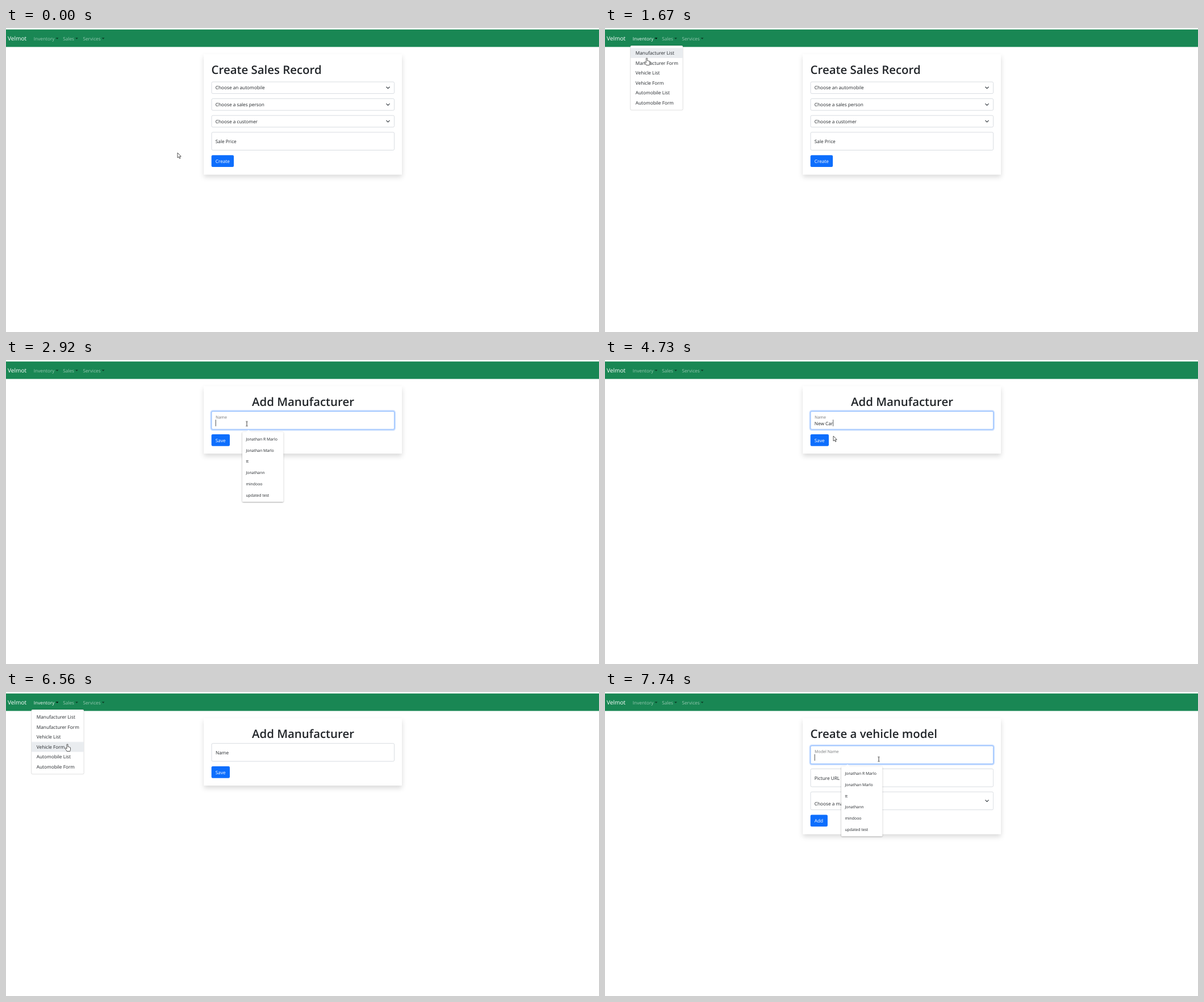
Animation, 1044 px wide and 536 px high, one loop 8 s. Source, as an HTML page:

```html
<!DOCTYPE html>
<html lang="en">
<head>
<meta charset="utf-8">
<title>Dealership forms</title>
<style>
html, body { margin: 0; width: 100%; height: 100%; overflow: hidden; background: #fff; }
svg { display: block; width: 1044px; height: 536px; font: 8.25px "Open Sans", "Noto Sans", sans-serif; text-rendering: geometricPrecision; }
text { fill: #212529; white-space: pre; }
.title { font-size: 20.4px; font-weight: 600; }
.brand { font-size: 10.1px; fill: #fff; }
.nav text, .nav path { fill: #fff; }
.nav { fill-opacity: .55; }
.card { fill: #fff; filter: url(#shadow); }
.box { fill: #fff; stroke: #ced4da; stroke-width: .8; }
.ring { fill: none; stroke: #0d6efd; stroke-opacity: .25; stroke-width: 2.2; }
.btn { fill: #0d6efd; }
.btn + text, .on-btn { fill: #fff; }
.caret { fill: #212529; }
.hints text { font-size: 6.9px; }
.hints rect { fill: #fff; filter: url(#popup); }
.pointer { fill: #fff; stroke: #111; stroke-width: .7; stroke-linejoin: round; }

/* hard switches */
#sales, #maker, #model, #menu, #hover, #invLink, #makerHints, #modelHints, #makerCaret,
#typed, #typeEdge, #modelCaret, #arrow, #hand, #beam { animation: 8s step-end infinite; }
/* eased changes */
#cursor, #makerBox, #makerRing, #makerLabel, #modelBox, #modelRing, #modelLabel,
#saveFill, #saveRing { animation: 8s linear infinite; }

#sales { animation-name: sales; }
#maker { animation-name: maker; }
#model { animation-name: model; }
@keyframes sales { 0% { opacity: 1 } 25.25%, 100% { opacity: 0 } }
@keyframes maker { 0% { opacity: 0 } 25.25% { opacity: 1 } 85.1%, 100% { opacity: 0 } }
@keyframes model { 0% { opacity: 0 } 85.1%, 100% { opacity: 1 } }

#menu { animation-name: menu; }
@keyframes menu { 0%, 25.25%, 85.1%, 100% { opacity: 0 } 11.6%, 76.1% { opacity: 1 } }
#hover { animation-name: hover; }
@keyframes hover {
  0%, 76.1%, 100% { opacity: 0; transform: none }
  16.8%, 79.5% { opacity: 1; transform: none }
  21.6%, 80.2% { opacity: 1; transform: translateY(17.56px) }
  80.9% { opacity: 1; transform: translateY(35.12px) }
  81.6% { opacity: 1; transform: translateY(52.68px) }
}
#invLink { animation-name: invLink; }
@keyframes invLink {
  0%, 25.25%, 85.1%, 100% { fill-opacity: .55 }
  8.13%, 73.9% { fill-opacity: .75 }
  11.6%, 76.1% { fill-opacity: .92 }
}

#makerBox { animation-name: makerBox; }
#makerRing { animation-name: makerRing; }
#makerLabel { animation-name: makerLabel; }
@keyframes makerBox { 0%, 34%, 65.8%, 100% { stroke: #ced4da } 35.9%, 64% { stroke: #86b7fe } }
@keyframes makerRing { 0%, 34%, 65.8%, 100% { opacity: 0 } 35.9%, 64% { opacity: 1 } }
@keyframes makerLabel {
  0%, 34%, 67.2%, 100% { transform: translate(369px, 109.6px); opacity: 1 }
  35.3%, 66% { transform: translate(369px, 103px) scale(.86); opacity: .65 }
}
#makerHints { animation-name: makerHints; }
@keyframes makerHints { 0%, 46.25%, 100% { opacity: 0 } 36.4% { opacity: 1 } }
#makerCaret { animation-name: makerCaret; }
@keyframes makerCaret { 0%, 40.62%, 64%, 100% { opacity: 0 } 34%, 46.25% { opacity: 1 } }
#typed { animation-name: typed; }
@keyframes typed { 0%, 66%, 100% { opacity: 0 } 46.25% { opacity: 1 } }
#typeEdge { animation-name: typeEdge; }
@keyframes typeEdge {
  0% { transform: none }
  46.25% { transform: translateX(6.1px) }
  48.12% { transform: translateX(10.7px) }
  49.2% { transform: translateX(17.1px) }
  50.2% { transform: translateX(19.2px) }
  51.3% { transform: translateX(24.4px) }
  52.37% { transform: translateX(29px) }
  54.87%, 100% { transform: translateX(32.4px) }
}
#saveFill { animation-name: saveFill; }
#saveRing { animation-name: saveRing; }
@keyframes saveFill { 0%, 61%, 78%, 100% { fill: #0d6efd } 62.9%, 76.1% { fill: #0b5ed7 } }
@keyframes saveRing { 0%, 64%, 78%, 100% { opacity: 0 } 65.8%, 76.1% { opacity: 1 } }

#modelBox { animation-name: modelBox; }
#modelRing { animation-name: modelRing; }
#modelLabel { animation-name: modelLabel; }
#modelCaret { animation-name: modelCaret; }
#modelHints { animation-name: modelHints; }
@keyframes modelBox { 0%, 94.7% { stroke: #ced4da } 96.6%, 100% { stroke: #86b7fe } }
@keyframes modelRing { 0%, 94.7% { opacity: 0 } 96.6%, 100% { opacity: 1 } }
@keyframes modelLabel {
  0%, 94.7% { transform: translate(369px, 113.9px); opacity: 1 }
  96%, 100% { transform: translate(369px, 107.4px) scale(.86); opacity: .65 }
}
@keyframes modelCaret { 0% { opacity: 0 } 94.7%, 100% { opacity: 1 } }
@keyframes modelHints { 0% { opacity: 0 } 96.7%, 100% { opacity: 1 } }

#cursor { animation-name: cursor; }
@keyframes cursor {
  0%, 2% { transform: translate(302px, 220px) }
  2.01% { transform: translate(326px, 217px) }
  5.5%, 8.12% { transform: translate(67px, 3px) }
  10.75% { transform: translate(70px, 15px) }
  14.75% { transform: translate(70px, 17px) }
  17.4% { transform: translate(72px, 40px) }
  20.88%, 21.4% { transform: translate(73.5px, 53px) }
  24.4%, 28.6% { transform: translate(89px, 65px) }
  32.2% { transform: translate(395px, 108px) }
  34%, 48.1% { transform: translate(424px, 112.5px) }
  52.4%, 58.3% { transform: translate(461px, 141px) }
  59.1%, 59.9% { transform: translate(402px, 134px) }
  62.2%, 69.4% { transform: translate(384px, 141px) }
  71.9% { transform: translate(22px, 52px) }
  73.5%, 74.3% { transform: translate(66.5px, 27.5px) }
  75.4%, 77.9% { transform: translate(69px, 19px) }
  79.6% { transform: translate(75px, 40px) }
  82%, 82.8% { transform: translate(108px, 92px) }
  83.8%, 89.75% { transform: translate(107px, 89px) }
  93.2% { transform: translate(460px, 114px) }
  94.6%, 100% { transform: translate(482px, 118.5px) }
}
#arrow { animation-name: arrow; }
#hand { animation-name: hand; }
#beam { animation-name: beam; }
@keyframes arrow {
  0%, 25.25%, 49.8%, 70%, 85.1% { opacity: 1 }
  8.13%, 32.8%, 61%, 73.4%, 92.6%, 100% { opacity: 0 }
}
@keyframes hand { 0%, 25.25%, 70%, 85.1%, 100% { opacity: 0 } 8.13%, 61%, 73.4% { opacity: 1 } }
@keyframes beam { 0%, 49.8% { opacity: 0 } 32.8%, 92.6%, 100% { opacity: 1 } }
</style>
</head>
<body>
<svg viewBox="0 0 1044 536">
  <defs>
    <filter id="shadow" x="-10%" y="-25%" width="120%" height="150%">
      <feDropShadow dx="0" dy="4.4" stdDeviation="4.4" flood-opacity=".15"/>
    </filter>
    <filter id="popup" x="-10%" y="-10%" width="120%" height="120%">
      <feDropShadow dx="0" dy=".8" stdDeviation="1.1" flood-opacity=".4"/>
    </filter>
    <path id="down" d="M0 0h4.8l-2.4 2.5z"/>
    <path id="chevron" d="M669.8 -1.3l2.7 2.7 2.7 -2.7" fill="none" stroke="#343a40" stroke-width="1.15" stroke-linecap="round" stroke-linejoin="round"/>
    <g id="select">
      <rect class="box" x="362" y="0" width="321.6" height="20.6" rx="2.2"/>
      <use href="#chevron" y="10.3"/>
    </g>
    <rect id="field" x="362" y="0" width="321.6" height="31.6" rx="2.2"/>
    <rect id="halo" x="360.8" y="-1.2" width="324" height="34" rx="3.2"/>
    <g id="hintList" class="hints">
      <rect x="416" y="127" width="72.3" height="123" rx="1.5"/>
      <path d="M423 127.2l4 -4 4 4z" fill="#fff"/>
      <text x="422.4" y="142">Jonathan R Marlo</text>
      <text x="422.4" y="161.7">Jonathan Marlo</text>
      <text x="422.4" y="181.4">tt</text>
      <text x="422.4" y="201.2">Jonathann</text>
      <text x="422.4" y="220.9">mindooo</text>
      <text x="422.4" y="240.7">updated test</text>
    </g>
  </defs>

  <rect y="2.6" width="1044" height="30.8" fill="#198754"/>
  <text class="brand" x="3" y="22.2">Velmot</text>
  <g class="nav" id="invLink"><text x="48.8" y="21.5">Inventory</text><use href="#down" x="87.6" y="17.3"/></g>
  <g class="nav"><text x="100.2" y="21.5">Sales</text><use href="#down" x="122.1" y="17.3"/></g>
  <g class="nav"><text x="135.4" y="21.5">Services</text><use href="#down" x="168.7" y="17.3"/></g>

  <g id="sales">
    <rect class="card" x="348.5" y="46.5" width="348.5" height="211.7"/>
    <text class="title" x="361.6" y="81.4">Create Sales Record</text>
    <use href="#select" y="95"/><text x="368.8" y="108.3">Choose an automobile</text>
    <use href="#select" y="124.6"/><text x="368.8" y="138">Choose a sales person</text>
    <use href="#select" y="154.2"/><text x="368.8" y="167.6">Choose a customer</text>
    <use class="box" href="#field" y="183.8"/><text x="368.8" y="202.8">Sale Price</text>
    <rect class="btn" x="361.7" y="224.2" width="39.4" height="20.8" rx="2.2"/>
    <text x="368.8" y="237.8">Create</text>
  </g>

  <g id="maker">
    <rect class="card" x="348.5" y="46.5" width="348.5" height="118.5"/>
    <text class="title" x="523" y="81.4" text-anchor="middle">Add Manufacturer</text>
    <use id="makerBox" class="box" href="#field" y="90.6"/>
    <use id="makerRing" class="ring" href="#halo" y="90.6"/>
    <text id="makerLabel">Name</text>
    <g id="typed"><text x="368.8" y="114.7">New Car</text></g>
    <g id="typeEdge">
      <rect x="369" y="105" width="36" height="13" fill="#fff"/>
      <rect id="makerCaret" class="caret" x="368.8" y="105.2" width=".8" height="11.6"/>
    </g>
    <rect id="saveFill" class="btn" x="361.7" y="131" width="32.3" height="20.8" rx="2.2"/>
    <rect id="saveRing" x="360.6" y="129.9" width="34.5" height="23" rx="3.2" fill="none" stroke="#3184fd" stroke-opacity=".5" stroke-width="2.2"/>
    <text class="on-btn" x="368.8" y="144.7">Save</text>
    <g id="makerHints"><use href="#hintList"/></g>
  </g>

  <g id="model">
    <rect class="card" x="348.5" y="46.5" width="348.5" height="204"/>
    <text class="title" x="361.6" y="81.4">Create a vehicle model</text>
    <use id="modelBox" class="box" href="#field" y="95"/>
    <use id="modelRing" class="ring" href="#halo" y="95"/>
    <text id="modelLabel">Model Name</text>
    <rect id="modelCaret" class="caret" x="368.8" y="109.6" width=".8" height="11.6"/>
    <use class="box" href="#field" y="135.5"/><text x="368.8" y="154.6">Picture URL</text>
    <use class="box" href="#field" y="176.1"/><use href="#chevron" y="191.9"/>
    <text x="368.8" y="199.6">Choose a manufacturer</text>
    <rect class="btn" x="361.7" y="216.5" width="30.2" height="20.8" rx="2.2"/>
    <text x="368.8" y="230.1">Add</text>
    <g id="modelHints"><use href="#hintList" y="4.3"/></g>
  </g>

  <g id="menu">
    <rect x="44.6" y="30.9" width="92.6" height="113.9" rx="2.2" fill="#fff" stroke="#000" stroke-opacity=".16" stroke-width=".8"/>
    <rect id="hover" x="45" y="35.3" width="91.8" height="17.56" fill="#e9ecef"/>
    <text x="53.8" y="47.2">Manufacturer List</text>
    <text x="53.8" y="64.8">Manufacturer Form</text>
    <text x="53.8" y="82.3">Vehicle List</text>
    <text x="53.8" y="99.9">Vehicle Form</text>
    <text x="53.8" y="117.4">Automobile List</text>
    <text x="53.8" y="135">Automobile Form</text>
  </g>

  <g id="cursor">
    <path id="arrow" class="pointer" d="M0 0V8.8L2 7 3.6 10.2 5 9.5 3.5 6.4H6.2Z"/>
    <path id="hand" class="pointer" d="M-1 .9Q-1 0 0 0T1 .9V4.6Q2.4 4 2.6 5.1 4 4.6 4.2 5.7 5.5 5.4 5.5 6.7V9Q5.5 10.6 4.7 12.5H-.8Q-2 10.4 -3.5 8.2 -4.2 6.8 -3.1 6.6 -2 6.6 -1 8Z"/>
    <path id="beam" d="M-1.7 -4H-.4L0 -3.6 .4 -4H1.7M0 -3.6V3.6M-1.7 4H-.4L0 3.6 .4 4H1.7" fill="none" stroke="#111" stroke-width=".8"/>
  </g>
</svg>
</body>
</html>
```
